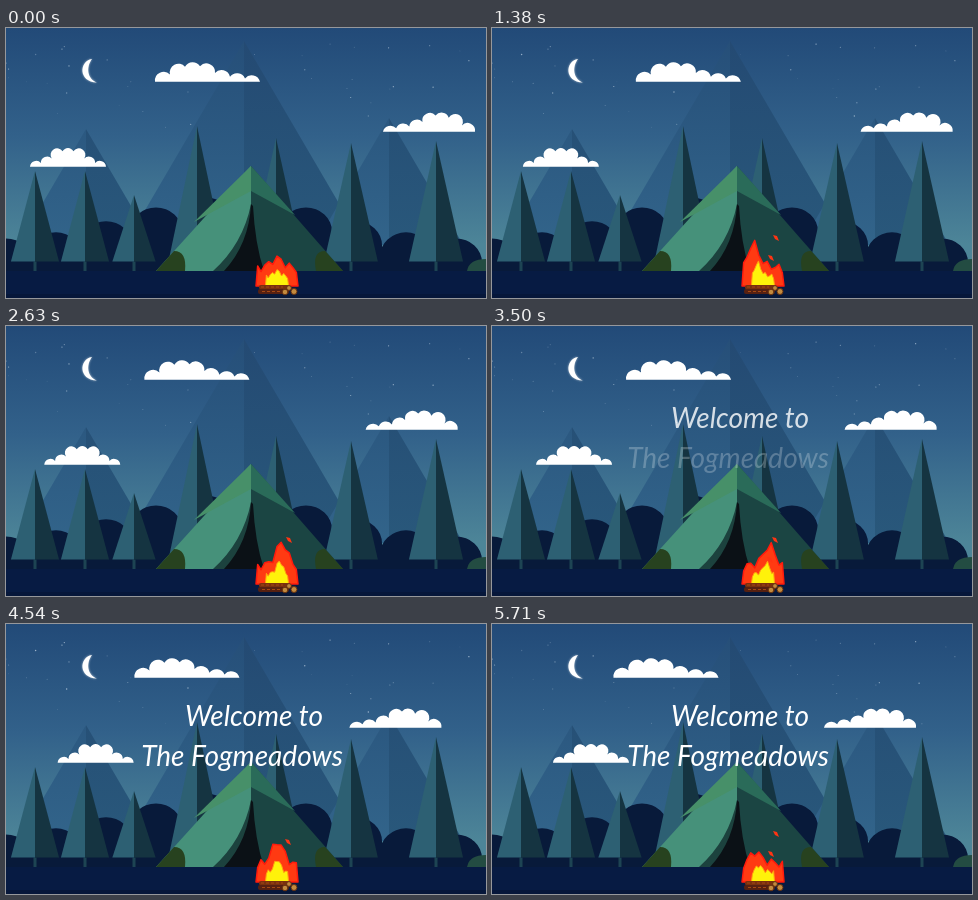
Animation, 480 px wide and 270 px high, one loop 5.75 s. Source, as an HTML page:

```html
<!DOCTYPE html>
<html lang="en">
<head>
<meta charset="utf-8">
<title>Night camp</title>
<style>
  html, body { margin: 0; width: 100%; height: 100%; overflow: hidden; background: #071b43; }
  svg { display: block; width: 100vw; height: 100vh; }
  text { font: italic 28px Lato, "Open Sans", sans-serif; fill: #fff; text-anchor: middle; }
</style>
</head>
<body>
<svg viewBox="0 0 480 270">
  <defs>
    <linearGradient id="sky" x2="0" y2="1">
      <stop offset="0" stop-color="#224a78"/>
      <stop offset=".4" stop-color="#32618a"/>
      <stop offset=".8" stop-color="#4d8598"/>
    </linearGradient>
    <linearGradient id="lit" gradientUnits="userSpaceOnUse" x1="0" y1="13" x2="0" y2="215">
      <stop offset="0" stop-color="#264f79"/>
      <stop offset="1" stop-color="#32648a"/>
    </linearGradient>
    <linearGradient id="shade" gradientUnits="userSpaceOnUse" x1="0" y1="13" x2="0" y2="215">
      <stop offset="0" stop-color="#244a73"/>
      <stop offset="1" stop-color="#29587b"/>
    </linearGradient>
    <filter id="glow" x="-50%" y="-50%" width="200%" height="200%">
      <feGaussianBlur stdDeviation="1.3"/>
    </filter>
    <path id="moon" d="M86 31C73 33 72 54 91 54.5C81 51 80 39 86 31Z" fill="#fff"/>
  </defs>

  <rect width="480" height="270" fill="url(#sky)"/>
  <g id="stars" fill="#d5e4f0"></g>
  <use href="#moon" filter="url(#glow)" opacity=".6"/>
  <use href="#moon"/>
  <g id="mountains"></g>
  <g id="clouds" fill="#fff"></g>
  <path id="hills" fill="#081a3a"/>
  <g id="trees"></g>
  <path fill="#071b43" d="M0 243H480V270H0Z"/>
  <path fill="#06173a" d="M0 266H480V270H0Z"/>
  <path fill="#234c42" d="M461 243Q463 231 480 231V243Z"/>

  <g id="tent">
    <path fill="#46917a" d="M245 138L150 243H245Z"/>
    <path fill="#479069" d="M245 138L188 194L245 163Z"/>
    <path fill="#1b4543" d="M245 138L337 243H245Z"/>
    <path fill="#2a6b59" d="M245 138L289 187L245 163Z"/>
    <path fill="#27421f" d="M150 243L168 223Q181 223 179 243ZM310 243Q306 223 319 223L337 243Z"/>
    <path fill="#1c423e" d="M245 176Q237 216 207 243H245Z"/>
    <path fill="#0b1116" d="M245 176Q243 216 218 243H258Q249 216 247 178Z"/>
  </g>

  <path id="flame" fill="#ff3a12" stroke="#ff1a0c" stroke-width="1.5" stroke-linejoin="round"/>
  <path id="core" fill="#fff20a" stroke="#ffa010" stroke-linejoin="round"/>
  <g id="sparks" fill="#ff3413"></g>
  <g id="logs">
    <rect x="253" y="257" width="31" height="4.5" rx="2" fill="#79300f"/>
    <rect x="252" y="261" width="31" height="5" rx="2" fill="#562011"/>
    <path d="M255 259H277M256 263.5H274" stroke="#a44812" stroke-dasharray="3 2"/>
    <g fill="#c28a3e" stroke="#65300f">
      <circle cx="279" cy="264" r="2.8"/>
      <circle cx="288" cy="263.5" r="3"/>
      <circle cx="283" cy="260" r="2.4"/>
    </g>
  </g>

  <text id="greeting" x="248" y="102">Welcome to</text>
  <text id="place" x="236" y="142">The Fogmeadows</text>
</svg>
<script>
const LOOP = 5750, FPS = 24, LAST = 137;
const $ = id => document.getElementById(id);
const clamp = v => Math.max(0, Math.min(1, v));
const bell = (x, width) => Math.exp(-((x / width) ** 2));
const wave = (frame, period) => Math.sin(2 * Math.PI * frame / period);
const range = (n, fn) => Array.from({ length: n }, (_, i) => fn(i));

function add(parent, tag, attrs) {
  const el = document.createElementNS("http://www.w3.org/2000/svg", tag);
  for (const key in attrs) el.setAttribute(key, attrs[key]);
  return parent.appendChild(el);
}

// A triangle split at its apex into a lit and a shaded half.
function peak(parent, x, top, base, half, lit, shade) {
  add(parent, "path", { d: `M${x} ${top}L${x - half} ${base}H${x}Z`, fill: lit });
  add(parent, "path", { d: `M${x} ${top}L${x + half} ${base}H${x}Z`, fill: shade });
}

function mountain(x, top) {
  peak($("mountains"), x, top, 217, (217 - top) * 0.585, "url(#lit)", "url(#shade)");
}

function tree(x, top) {
  const base = 233.5;
  add($("trees"), "rect", { x: x - 1.5, y: base, width: 3, height: 10, fill: "#1d4453" });
  peak($("trees"), x, top, base, 15 + (base - top) * 0.1, "#2d6073", "#153441");
}

// A flat-bottomed row of puffs, tallest around the crest.
function cloud(x, base, width, crest, shift) {
  const puffs = 7, step = width / puffs;
  let d = `M${x} ${base}`;
  for (let i = 1; i <= puffs; i++) {
    const s = i / puffs;
    const height = i < puffs ? 12 * bell(s - crest, 0.2) + 5 * Math.sqrt(Math.sin(Math.PI * s)) : 0;
    d += `A${step * 0.58} ${step * 0.58} 0 0 1 ${x + i * step} ${base - height}`;
  }
  return { shift, el: add($("clouds"), "path", { d: d + "Z" }) };
}

mountain(238, 13);
mountain(80, 101);
mountain(383, 90);

tree(191, 98);
tree(270, 110);
tree(29, 143);
tree(79, 143);
tree(128, 167);
tree(345, 115);
tree(430, 113);

const clouds = [
  cloud(149, 53.7, 105, 0.357, -27.5),
  cloud(377, 103.7, 92, 0.62, -45),
  cloud(24, 138.7, 76, 0.5, 37)
];

// Round bushes that grow taller towards the tent.
$("hills").setAttribute("d", range(10, i => {
  const x = i * 50, top = 214 - 46 * bell(x - 225, 140);
  return `M${x - 26} 243V${top + 24}A26 24 0 0 1 ${x + 26} ${top + 24}V243Z`;
}).join(""));

let seed = 17;
const random = () => (seed = seed * 16807 % 2147483647) / 2147483647;
const stars = range(42, () => add($("stars"), "circle", {
  cx: random() * 480, cy: 15 + random() * 85, r: 0.35 + random() * 0.4
}));

const sparks = [0, 5].map(lag => ({ lag, el: add($("sparks"), "path", { d: "M-3 -3L1 -2L3 3L-1 1Z" }) }));

// One leaning tongue over a jagged skirt; scale shrinks it towards its foot.
function flameOutline(frame, scale) {
  const height = 39 + 12 * wave(frame - 108, 47);
  const lean = -0.4 * wave(frame, 110) + 0.12 * Math.sin(frame * 1.7);
  const points = range(13, i => {
    const s = i / 6 - 1;
    const edge = Math.sqrt(1 - s * s);
    const skirt = 13 + 7 * edge + 4 * Math.sin(frame * 1.3 + i * 2.2);
    const tongue = (height - 20) * bell(s - lean, 0.32) * edge;
    const x = s * (21 + 4 * edge);
    return `${271 + x * scale} ${258 - (i % 12 ? skirt + tongue : 0) * scale}`;
  });
  return "M" + points.join("L") + "Z";
}

function draw(time) {
  const frame = Math.min(LAST, Math.floor((time + 5) * FPS / 1000));
  const ms = frame * 1000 / FPS;
  const u = frame / LAST;
  const drift = 0.7 * u + 0.3 * u * u;

  for (const { el, shift } of clouds) el.setAttribute("transform", `translate(${shift * drift} 0)`);
  stars.forEach((star, i) => star.setAttribute("opacity", 0.45 + 0.25 * Math.sin(ms / 420 + i * 2.4)));

  $("flame").setAttribute("d", flameOutline(frame, 1));
  $("core").setAttribute("d", flameOutline(frame, 0.55));

  for (const { el, lag } of sparks) {
    const age = frame % 26 - lag;
    el.setAttribute("visibility", age > 0 && age < 10 ? "visible" : "hidden");
    el.setAttribute("transform", `translate(${277 + age} ${238 - age * 4})`);
  }

  $("greeting").setAttribute("opacity", clamp((ms - 3000) / 620));
  $("place").setAttribute("opacity", clamp((ms - 3200) / 1250));
}

let start;
function tick(now) {
  start ??= now;
  draw((now - start) % LOOP);
  requestAnimationFrame(tick);
}
draw(0);
requestAnimationFrame(tick);
</script>
</body>
</html>
```
